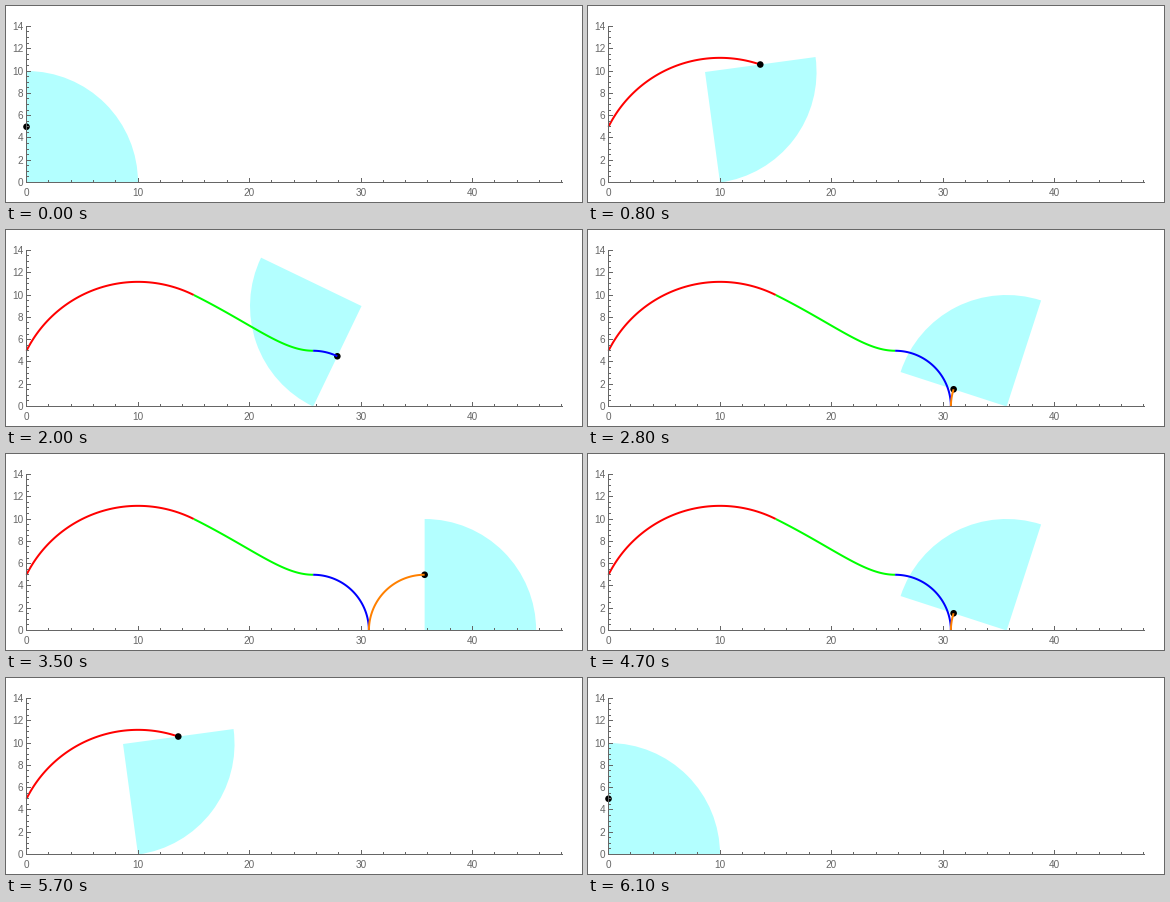
A matplotlib script for the animation above (6.2 s loop, 576x196 px).

```python
import matplotlib.pyplot as plt
import numpy as np
from matplotlib.animation import FuncAnimation
from matplotlib.patches import Circle, Rectangle, Wedge

W, H, DPI = 576, 196, 64
PT = 72 / DPI                      # points per pixel
X0, Y0, UNIT = 20.5, 176.5, 11.15  # axis origin and pixels per unit
R = 10                             # radius of the quarter disc
STEPS, HOLD_END, FRAMES = 35, 44, 62
GREY = "#666666"
COLORS = ["#ff0000", "#00ff00", "#0000ff", "#ff8000"]

fig = plt.figure(figsize=(W / DPI, H / DPI), dpi=DPI, facecolor="white")
ax = fig.add_axes([0, 0, 1, 1])
ax.set_xlim(0, W)
ax.set_ylim(H, 0)
ax.axis("off")


def to_px(x, y):
    return X0 + UNIT * x, Y0 - UNIT * y


def apex(phase, a):
    """Corner of the quarter disc after rolling through angle a."""
    b = a - phase * np.pi / 2
    arc_end = R + R * np.pi / 2
    if phase == 0:
        return R - R * np.cos(b), R * np.sin(b)
    if phase == 1:
        return R + R * b, R + 0 * b
    if phase == 2:
        return arc_end + R * np.sin(b), R * np.cos(b)
    return arc_end + R + 0 * b, 0 * b


def marker(phase, a):
    """Midpoint of the straight edge that starts out vertical."""
    x, y = apex(phase, a)
    return to_px(x + R / 2 * np.sin(a), y + R / 2 * np.cos(a))


def bar(x, y, w, h):
    ax.add_patch(Rectangle((x, y), w, h, fc=GREY, lw=0, zorder=6))


def label(x, baseline, value, ha):
    ax.text(x, baseline, str(value), ha=ha, va="baseline", color=GREY,
            family="Liberation Sans", size=10 * PT, zorder=6)


def draw_axes():
    bar(20, 176, 537, 1)
    bar(20, 20, 1, 157)
    for v in range(0, 49, 2):
        x = int(to_px(v, 0)[0])
        size = 4 if v % 10 == 0 else 2
        bar(x, 176 - size, 1, size)
        if v % 10 == 0:
            label(x, 189.5, v, "center")
    for v in np.arange(0, 14.5, 0.5):
        y = int(to_px(0, v)[1])
        major = v % 2 == 0
        bar(21, y, 4 if major else 2, 1)
        if major:
            label(17.5, y + 4, int(v), "right")


draw_axes()
sector = ax.add_patch(Wedge((0, 0), R * UNIT, 0, 90, fc="#b3ffff", lw=0, zorder=1))
dot = ax.add_patch(Circle((0, 0), 3.3, fc="black", lw=0, zorder=3))
trails = [ax.plot([], [], color=c, lw=2 * PT, solid_capstyle="butt",
                  zorder=2 if i == 0 else 4)[0]
          for i, c in enumerate(COLORS)]


def step_at(frame):
    if frame < HOLD_END:
        return min(frame, STEPS)
    return STEPS - 1 - 2 * (frame - HOLD_END)


def update(frame):
    a = 2 * np.pi * step_at(frame) / STEPS
    phase = min(int(a / (np.pi / 2)), 3)
    sector.set_center(to_px(*apex(phase, a)))
    turn = np.degrees(a)
    # y points down, so a clockwise turn is positive
    sector.set_theta1(turn - 90)
    sector.set_theta2(turn)
    dot.center = marker(phase, a)
    for i, trail in enumerate(trails):
        start = i * np.pi / 2
        end = min(a, start + np.pi / 2)
        if end > start:
            trail.set_data(*marker(i, np.linspace(start, end, 60)))
        else:
            trail.set_data([], [])
    return [sector, dot, *trails]


anim = FuncAnimation(fig, update, frames=FRAMES, interval=100,
                     repeat=True, repeat_delay=0, blit=False)
plt.show()
```
